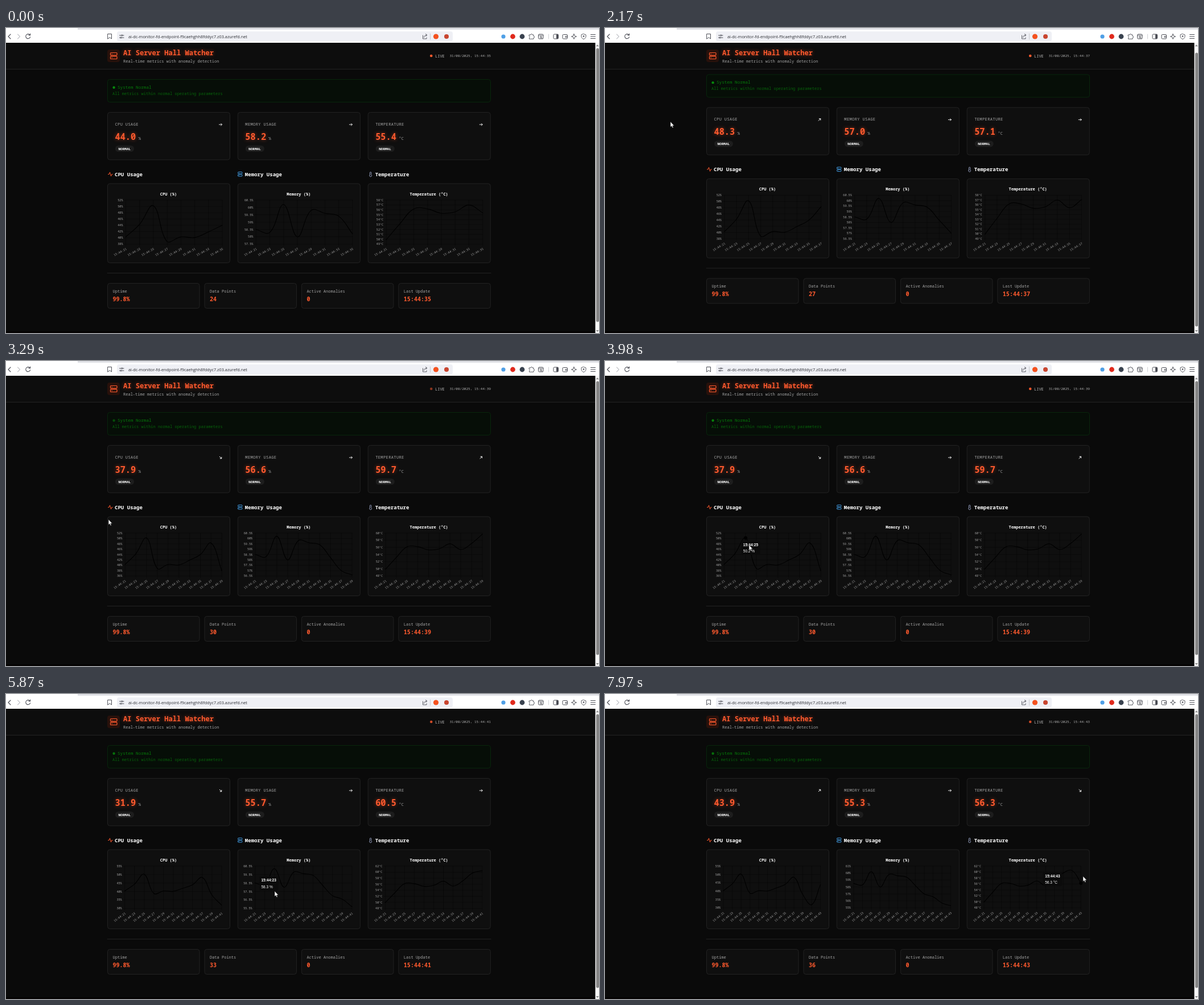
Recreate the animation shown at these times as an HTML page. Size 1042 px wide and 537 px high, loop 8000 ms.

```html
<!DOCTYPE html>
<html lang="en">
<head>
<meta charset="utf-8">
<title>Metrics dashboard</title>
<style>
  html, body { margin: 0; width: 100%; height: 100%; overflow: hidden; background: #0a0a0a; }
  svg { display: block; width: 100%; height: 100%; }
  text { font-family: "Noto Sans Mono", "DejaVu Sans Mono", monospace; white-space: pre; }
  .url { font-family: "Open Sans", "Noto Sans", sans-serif; }
  .tip { font-family: "Liberation Sans", Arial, sans-serif; }
  .glow { filter: drop-shadow(0 0 3px rgba(255, 80, 35, .5)); }
  .line { fill: none; stroke-linecap: round; stroke-linejoin: round; }
</style>
</head>
<body>
<svg viewBox="0 0 1042 537">
  <rect width="1042" height="537" fill="#0a0a0a"/>
  <g id="page"><g id="fixed"></g><g id="live"></g></g>
  <g id="header"></g>
  <g id="clock"></g>
  <g id="chrome"></g>
  <rect id="thumb" x="1037" y="35.5" width="5" height="482" rx="2.5" fill="#868686"/>
  <path id="cursor" d="M0 0V9.2L2.1 7.3 3.6 10.6 5 10 3.6 6.8H6.4Z" fill="#fff" stroke="#222" stroke-width=".5"/>
</svg>
<script>
const LOOP = 8000;
const PULSE = 2110;
const ACCENT = '#ff5a2e';
const LEFT = 178.5, COLUMN = 228.85, TOP = 303;
const FIRST_COUNT = 8;
const UPDATES = [100, 2220, 4300, 6380];

// ticks: [min, max, step] for each point count from FIRST_COUNT on
const METRICS = [
  { name: 'CPU', heading: 'CPU Usage', label: 'CPU USAGE', unit: '%',
    data: [40.3, 44.3, 50.2, 38.8, 40.3, 40.1, 41.9, 44, 48.3, 37.9, 31.9, 43.9],
    ticks: [[38, 52, 2], [38, 52, 2], [36, 52, 2], [30, 55, 5], [30, 55, 5]],
    trend: [0, -1, 1, 1, -1] },
  { name: 'Memory', heading: 'Memory Usage', label: 'MEMORY USAGE', unit: '%',
    data: [58.5, 58.3, 60.2, 58, 59.8, 59.6, 59.4, 58.2, 57, 56.6, 55.7, 55.3],
    ticks: [[57.5, 60.5, .5], [56.5, 60.5, .5], [56.5, 60.5, .5], [55.5, 60.5, 1], [55, 61, 1]],
    trend: [0, 0, 0, 0, 0] },
  { name: 'Temperature', heading: 'Temperature', label: 'TEMPERATURE', unit: '°C',
    data: [49.9, 53.2, 56.2, 56.2, 55.3, 55.6, 57, 55.4, 57.1, 59.7, 60.5, 56.3],
    ticks: [[49, 58, 1], [49, 58, 1], [48, 60, 2], [48, 62, 2], [48, 62, 2]],
    trend: [0, 0, -1, 0, 1] },
];

const CURSOR = [
  [350, 1014, 517], [1120, 460, 236], [1750, 115, 165], [2170, 115, 165], [2870, 128, 245],
  [3500, 206, 296], [3770, 235, 310], [3980, 253, 324], [4890, 312, 357], [5450, 380, 355],
  [5700, 435, 350], [6000, 500, 345], [6400, 540, 332], [6710, 558, 328], [7130, 640, 318],
  [7400, 690, 328], [7840, 840, 321],
];
const SCROLL = [[2100, 0], [2170, 8.5], [2240, 13], [2870, 13], [2940, 2], [3010, 0]];

const el = id => document.getElementById(id);
const lerp = (a, b, p) => a + (b - a) * p;
const clamp = (v, lo, hi) => Math.min(hi, Math.max(lo, v));
const range = n => Array.from({ length: n }, (_, i) => i);
const stamp = i => `15:44:${21 + 2 * i}`;

function along(keys, t) {
  if (t <= keys[0][0]) return keys[0].slice(1);
  const i = keys.findIndex(k => k[0] > t);
  if (i < 0) return keys[keys.length - 1].slice(1);
  const a = keys[i - 1], b = keys[i], p = (t - a[0]) / (b[0] - a[0]);
  return a.slice(1).map((v, j) => lerp(v, b[j + 1], p));
}

// Text placed by the vertical middle of its capitals
const text = (x, middle, size, fill, str, extra = '') =>
  `<text x="${x}" y="${middle + size * .36}" font-size="${size}" fill="${fill}" ${extra}>${str}</text>`;
const box = (x, y, w, h, r, fill, stroke = 'none', extra = '') =>
  `<rect x="${x}" y="${y}" width="${w}" height="${h}" rx="${r}" fill="${fill}" stroke="${stroke}" ${extra}/>`;
const dot = (x, y, r, fill, extra = '') => `<circle cx="${x}" cy="${y}" r="${r}" fill="${fill}" ${extra}/>`;
const line = (d, stroke, width = 1, extra = '') =>
  `<path class="line" d="${d}" stroke="${stroke}" stroke-width="${width}" ${extra}/>`;
const BOLD = 'font-weight="700"';

const serverIcon = (x, y, w, h, color, width) =>
  box(x, y, w, h * .42, 1, 'none', color, `stroke-width="${width}"`) +
  box(x, y + h * .58, w, h * .42, 1, 'none', color, `stroke-width="${width}"`) +
  line(`M${x + w * .22} ${y + h * .21}h.2M${x + w * .22} ${y + h * .79}h.2`, color, width);

function drawFixed() {
  const card = (x, y, w, h) => box(x, y, w, h, 4, '#0f0f0f', '#222');
  let out = box(LEFT, 90.5, 673, 40, 4, '#060e07', '#08260c') +
    text(196, 104, 7.65, '#067a0a', 'System Normal') +
    text(187, 115.5, 7.03, '#07640b', 'All metrics within normal operating parameters');
  METRICS.forEach((m, c) => {
    const x = LEFT + c * COLUMN;
    out += card(x, 148.5, 215, 83.5) + card(x, 274, 215, 139.5) +
      text(x + 13, 169, 7.03, '#a3a3a3', m.label, 'letter-spacing=".38"') +
      text(x + 54, 194, 7.4, '#999', m.unit) +
      box(x + 13.5, 207, 33, 11, 5.5, '#1d1d1d') +
      text(x + 19, 212.5, 6, '#fff', 'NORMAL', BOLD) +
      text(x + 12.5, 257.5, 9.05, '#fff', m.heading, BOLD) +
      text(x + 107, 292.5, 7, '#fff', `${m.name} (${m.unit})`, BOLD + ' text-anchor="middle"');
  });
  out += line('M179.5 257.5h1.6l1.4-3.6 2 7 1.4-3.4h1.2', ACCENT) +
    serverIcon(407.5, 253.5, 7.5, 7.6, '#3f97dc', 1) +
    line('M639.4 258.4v-3.6a1.2 1.2 0 0 1 2.4 0v3.6a1.9 1.9 0 1 1-2.4 0Z', '#a3aed2', .9) +
    line('M178 431.5H852', '#222');
  ['Uptime', 'Data Points', 'Active Anomalies', 'Last Update'].forEach((label, i) => {
    const x = LEFT + i * 170.45;
    out += card(x, 449.5, 161.5, 44) + text(x + 9, 463.5, 7.03, '#a3a3a3', label);
  });
  el('fixed').innerHTML = out;
}

function drawHeader() {
  el('header').innerHTML = box(0, 26, 1036, 46, 0, '#0d0d0d') + line('M0 72.5H1035', '#232323') +
    box(178, 38, 22, 22, 4, '#28110b') + serverIcon(183.5, 43.5, 11.5, 11, ACCENT, 1.2) +
    text(206, 44, 12.05, ACCENT, 'AI Server Hall Watcher', BOLD + ' class="glow"') +
    text(206, 58, 7.03, '#a3a3a3', 'Real-time metrics with anomaly detection') +
    text(754, 49, 7, '#b4b4b4', 'LIVE') +
    box(0, 534, 1036, 3, 0, '#050303');
}

function drawChrome() {
  const ink = '#4b4d55';
  const frame = (x, y, w, h) => box(x, y, w, h, 1.5, 'none', ink);
  const ring = (x, y, r) => dot(x, y, r, 'none', `stroke="${ink}" stroke-width=".9"`);
  el('chrome').innerHTML = box(0, 0, 1042, 26, 0, '#fff') + box(126, 0, 916, 3, 0, '#e0e1e6') +
    box(195, 6, 590, 17.5, 4, '#eff0f5') +
    line('M8 11 4 15l4 4', ink, 1.1) + line('M20.5 11l4 4-4 4', '#c4c5ca', 1.1) +
    line('M42 12.3a4 4 0 1 0 .6 3.5M42.6 10v2.8h-2.8', ink, 1.1) +
    line('M179 10.5h6.5v8.5l-3.2-2.5-3.3 2.5Z', ink) +
    line('M199.5 13h3M205 13h2M199.5 17h1.5M203.5 17h3.5', ink) +
    ring(203.8, 13, 1.1) + ring(202, 17, 1.1) +
    text(215, 15, 7.33, '#2b2d33', 'ai-dc-monitor-fd-endpoint-f9caehghh8fddyc7.z03.azurefd.net', 'class="url"') +
    line('M732.5 13v6h6.5v-2M734.5 16.500c0-2.5 2-4 5-4M737.5 10.5l2.5 2-2.5 2', ink, .9) +
    line('M745.5 10v10', '#c8c9cf') +
    dot(755.5, 15, 4.6, '#f4511e') + dot(774, 15, 4, '#c8452f') +
    dot(874, 15, 3.6, '#4f9fe6') + dot(890.5, 15, 4.4, '#e0291c') + dot(907, 15, 4.4, '#39424f') +
    line('M919.5 12h2.5a1.5 1.5 0 0 1 3 0h2v2.3a1.5 1.5 0 0 1 0 3v2h-7.5v-2.2a1.5 1.5 0 0 0 0-2.8Z', ink, .9) +
    frame(935.5, 11, 8.5, 8) + line('M935.5 13h8.5M941.5 17.5l1.5 1.5', ink, .8) + ring(940, 16, 1.5) +
    line('M953.5 11v8', '#d0d1d6') +
    frame(962, 11, 8.5, 8) + box(967, 11, 3.5, 8, 1, ink) +
    frame(978, 11.5, 8.5, 7.5) + line('M986 14.5h-3v2h3', ink, .9) +
    line('M998 10.5l1.2 3.3 3.3 1.2-3.3 1.2-1.2 3.3-1.2-3.3-3.3-1.2 3.3-1.2Z', ink, .9) +
    line('M1015 10.5l4 1.5v3c0 2-1.7 3.7-4 4.7-2.3-1-4-2.7-4-4.7v-3Z', ink, .9) + dot(1015, 14.5, 1.3, ink) +
    line('M1027.5 11.5h8M1027.5 15h8M1027.5 18.5h8', ink, 1.1) +
    box(1035.5, 26, 6.5, 511, 0, '#f8f8f8') +
    '<path d="M1036.7 32.3h5l-2.5-3ZM1036.7 532h5l-2.5 3Z" fill="#868686"/>';
}

function plotArea(c, n) {
  const extra = n - FIRST_COUNT, x = LEFT + c * COLUMN;
  const left = x + 32 - extra * .6, right = x + 201.5 - extra * .35, bottom = 380.5 - extra;
  const [min, max, step] = METRICS[c].ticks[extra];
  return { left, right, bottom, min, max, step,
    px: i => lerp(left, right, i / (n - 1)),
    py: v => lerp(bottom, TOP, (v - min) / (max - min)) };
}

// Known points glide from their old places; the new one rises from the axis
function plotPoints(c, n, t) {
  const { data } = METRICS[c], area = plotArea(c, n);
  const target = data.slice(0, n).map((v, i) => [area.px(i), area.py(v)]);
  if (n === FIRST_COUNT) return target;
  const before = plotArea(c, n - 1);
  const p = clamp((t - UPDATES[n - FIRST_COUNT - 1]) / 1000, 0, 1);
  const eased = 1 - (1 - p) ** 4;
  return target.map(([x, y], i) => i === n - 1
    ? [x, lerp(area.bottom, y, eased)]
    : [lerp(before.px(i), x, eased), lerp(before.py(data[i]), y, eased)]);
}

function smoothPath(pts, bottom) {
  const gap = (a, b) => Math.hypot(a[0] - b[0], a[1] - b[1]);
  const ctrl = pts.map((p, i) => {
    const a = pts[i - 1] || p, b = pts[i + 1] || p;
    const before = gap(a, p), after = gap(p, b), k = .4 / (before + after);
    const at = s => [p[0] + s * (b[0] - a[0]), clamp(p[1] + s * (b[1] - a[1]), TOP, bottom)];
    return [at(-k * before), at(k * after)];
  });
  return pts.map((p, i) => i ? `C${ctrl[i - 1][1]} ${ctrl[i][0]} ${p}` : `M${p}`).join('');
}

function drawChart(c, n, t) {
  const a = plotArea(c, n), angle = -28 - 2.75 * (n - FIRST_COUNT);
  const rows = Math.round((a.max - a.min) / a.step) + 1;
  let grid = '', labels = '';
  range(rows).forEach(i => {
    const v = a.min + i * a.step, y = a.py(v);
    grid += `M${a.left - 3} ${y}H${a.right}`;
    labels += text(a.left - 5, y, 5.15, '#a3a3a3', v + METRICS[c].unit, 'text-anchor="end"');
  });
  range(n).forEach(i => {
    const x = a.px(i);
    grid += `M${x} ${TOP}V${a.bottom + 3}`;
    labels += `<g transform="translate(${x + 1} ${a.bottom + 8}) rotate(${angle})">` +
      text(0, 0, 5.15, '#a3a3a3', stamp(i), 'text-anchor="end"') + '</g>';
  });
  return line(grid, '#000', .6, 'opacity=".6"') + labels + line(smoothPath(plotPoints(c, n, t), a.bottom), '#000', 1.1);
}

// Chart and nearest point under the pointer, one beat behind it
function hovered(t, n) {
  const [x, y] = along(CURSOR, t - 100);
  const c = Math.floor((x - LEFT) / COLUMN), local = x - LEFT - c * COLUMN;
  if (t < 3000 || c < 0 || c > 2 || local < 8 || local > 208 || y < 282 || y > 405) return null;
  const a = plotArea(c, n);
  return { c, i: clamp(Math.round((x - a.left) / (a.right - a.left) * (n - 1)), 0, n - 1) };
}

function drawTooltip(t, n) {
  const now = hovered(t, n);
  if (!now) return '';
  const { c, i } = now, pts = plotPoints(c, n, t), middle = LEFT + c * COLUMN + 115;
  const width = 33.5, height = 25, pad = 3.5;
  const recent = range(8).map(k => hovered(t - k * 35, n)).filter(h => h && h.c === c)
    .map(h => pts[h.i]).map(([x, y]) => [x > middle ? x - 4 - width : x + 4, y - height / 2]);
  const mean = j => recent.reduce((sum, p) => sum + p[j], 0) / recent.length;
  const x = mean(0), y = mean(1);
  return dot(...pts[i], 3, '#000') + box(x, y, width, height, 3, '#0c0c0c', 'none', 'opacity=".9"') +
    text(x + pad, y + 7, 6.6, '#fff', stamp(i), BOLD + ' class="tip"') +
    text(x + pad, y + 18.3, 6.5, '#fff', `${METRICS[c].data[i].toFixed(1)} ${METRICS[c].unit}`, 'class="tip"');
}

function render(t) {
  const n = FIRST_COUNT + UPDATES.filter(u => u <= t).length;
  const pulse = .75 + .25 * Math.cos(2 * Math.PI * t / PULSE);
  const [scroll] = along(SCROLL, t);

  let out = dot(189.6, 104.7, 2.2, '#078a0c', `opacity="${pulse}"`);
  METRICS.forEach((m, c) => {
    const x = LEFT + c * COLUMN;
    out += text(x + 13, 191.5, 15.3, ACCENT, m.data[n - 1].toFixed(1), BOLD + ' class="glow"') +
      line('M-2.5 0H2.5M.7-1.8 2.5 0 .7 1.8', '#fff', .9,
        `transform="translate(${x + 198.5} 170) rotate(${45 * m.trend[n - FIRST_COUNT]})"`) +
      drawChart(c, n, t);
  });
  ['99.8%', 24 + 3 * (n - FIRST_COUNT), 0, stamp(n - 1)].forEach((v, i) => {
    out += text(LEFT + 9 + i * 170.45, 477, 10.05, ACCENT, v, 'font-weight="600"');
  });
  el('live').innerHTML = out + drawTooltip(t, n);
  el('page').setAttribute('transform', `translate(0 ${-scroll})`);
  el('thumb').setAttribute('y', 35.5 + scroll * .92);

  el('clock').innerHTML = dot(747.2, 49, 2.3, ACCENT, `opacity="${pulse}"`) +
    text(779.5, 49, 6.04, '#b4b4b4', `31/08/2025, ${stamp(n - 1)}`);

  const [x, y] = along(CURSOR, t);
  el('cursor').setAttribute('transform', `translate(${x} ${y})`);
  el('cursor').setAttribute('visibility', t < CURSOR[0][0] ? 'hidden' : 'visible');
}

drawFixed();
drawHeader();
drawChrome();
const start = performance.now();
function tick() {
  render((performance.now() - start) % LOOP);
  requestAnimationFrame(tick);
}
tick();
</script>
</body>
</html>
```
